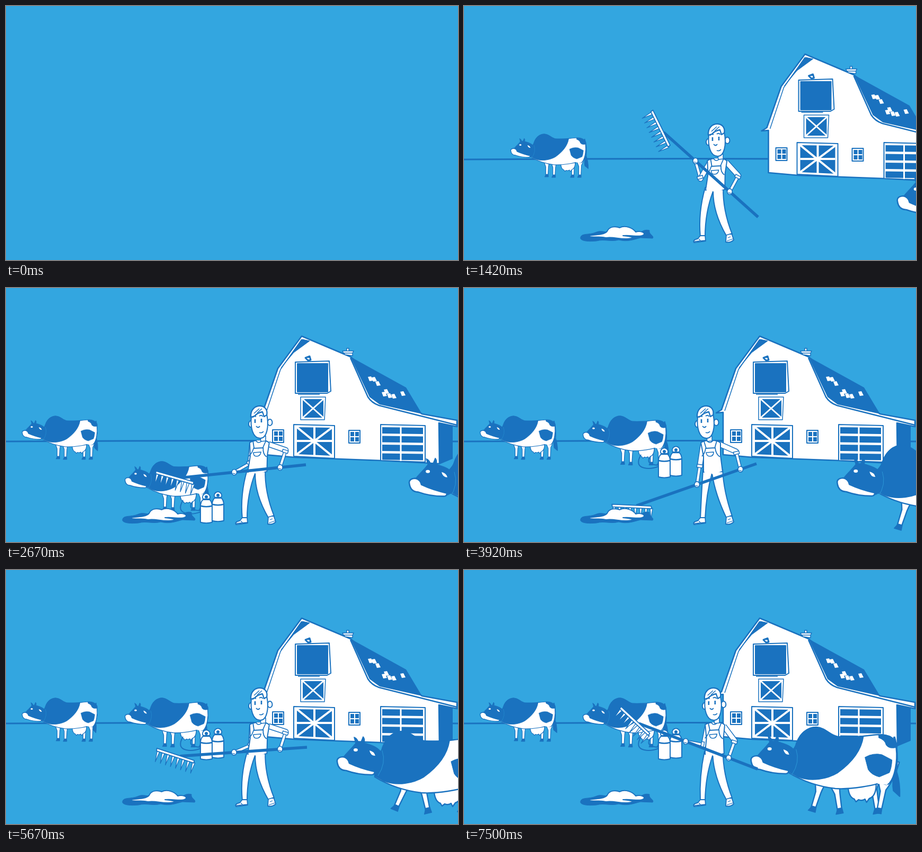
These frames come from a looping animation (853x480 px, 7580 ms). An HTML page with a canvas:

```html
<!DOCTYPE html>
<html>
<head>
<meta charset="utf-8">
<style>
html, body { margin: 0; width: 100%; height: 100%; overflow: hidden; background: #33a6e0; }
canvas { display: block; }
</style>
</head>
<body>
<canvas id="stage" width="853" height="480"></canvas>
<script>
const c = document.getElementById('stage').getContext('2d');
const SKY = '#33a6e0', DARK = '#1a72bf', WHITE = '#fff';
const LOOP = 7580, STEP = LOOP / 91, CYCLE = 3167, RAD = Math.PI / 180;
c.lineJoin = 'round';

function draw(d, fill, width = 2, stroke = DARK) {
  const path = new Path2D(d);
  if (fill) { c.fillStyle = fill; c.fill(path); }
  if (width) { c.lineWidth = width; c.strokeStyle = stroke; c.stroke(path); }
}
function place(x, y, deg, sx, sy, fn) {
  c.save();
  c.translate(x, y);
  c.rotate(deg * RAD);
  c.scale(sx, sy);
  fn();
  c.restore();
}
function dot(x, y, rx, ry, fill, width = 0) {
  c.beginPath();
  c.ellipse(x, y, rx, ry, 0, 0, 7);
  c.fillStyle = fill;
  c.fill();
  if (width) { c.lineWidth = width; c.strokeStyle = DARK; c.stroke(); }
}
const clamp = u => Math.max(0, Math.min(1, u));

// Eased values between rows of [time, ...values]
function keyed(t, rows) {
  let i = 1;
  while (i < rows.length - 1 && t > rows[i][0]) i++;
  const a = rows[i - 1], b = rows[i];
  const u = clamp((t - a[0]) / (b[0] - a[0])), s = u * u * (3 - 2 * u);
  return a.slice(1).map((v, k) => v + (b[k + 1] - v) * s);
}
// Damped spring that ends at rest
function spring(t, start, from) {
  const dt = Math.max(0, t - start), u = clamp(dt / 1600);
  return from * (1 - u) ** 2 * Math.cos(Math.PI * dt / 500);
}

function leg(x, y, deg, hind) {
  place(x, y, deg, 1, 1, () => {
    const len = hind ? 72 : 60;
    draw(hind ? 'M-18,-30L22,-30Q18,5 6,26L4,68L-4,68L-4,30Q-14,8 -18,-30Z'
              : 'M-15,-8L13,-8Q6,8 5,22L3,57L-5,57L-5,22Z', WHITE, 2.4);
    draw(`M-4,${len - 10}L4,${len - 10}L5,${len}L-9,${len}Z`, DARK, 1.5);
  });
}
function cow(x, y, sx, sy, { swing = 0, nod = 0, bob = 0, wag }) {
  place(x, y, 0, sx, sy, () => {
    leg(160, 104, -swing * .7);
    leg(134, 102, swing * 1.15);
    leg(228, 92, -swing * .7, true);
    leg(254, 92, swing * .7, true);
    place(0, bob, 0, 1, 1, () => {
      place(271, 18, wag, 1, 1, () => {
        draw('M0,0Q8,27 3,72', null, 4);
        draw('M1,67Q-5,87 -2,102L10,113Q11,87 5,68Z', DARK);
      });
      draw('M184,112Q185,132 196,136l3,5 5,-4Q210,140 216,136l3,6 5,-7Q238,130 237,105Z', WHITE, 2.4);
      draw('M84,40C90,12 108,0 124,0C142,1 150,16 165,18C190,21 215,16 242,14C262,14 272,22 275,40C278,65 272,95 262,106C258,110 252,108 247,104C235,110 190,118 160,116C125,112 95,100 72,86Z', WHITE, 2.4);
      // Cover the outline where the thigh joins the body
      draw('M228,70L268,72Q266,95 258,109L240,107Z', WHITE, 0);
      draw('M66,60C78,44 84,40 88,28C94,10 108,0 124,0C142,1 150,16 165,18L213,18C209,45 190,68 165,86C145,98 115,104 90,94L72,84Z', DARK, 1.5);
      draw('M242,14Q268,12 276,30L277,38Q262,42 256,34Q254,24 242,20Z', DARK, 1);
      draw('M216,57Q232,48 248,52L267,62Q266,78 262,86L243,94Q228,90 222,80Z', DARK, 1);
    });
    place(0, nod, 0, 1, 1, () => {
      draw('M36,28L33,17Q40,20 41,27ZM46,26L50,16Q54,20 52,27Z', DARK, 1.5);
      draw('M12,55C20,45 28,38 36,28Q45,24 60,30C80,36 90,46 88,64C85,80 78,84 72,86L20,80Z', DARK, 1);
      draw('M1,63Q0,55 12,54Q22,56 24,66Q45,76 72,82Q72,88 66,88Q40,88 18,80Q3,80 1,63Z', WHITE, 2.6);
      draw('M62,42q9,2 11,10q-9,0 -11,-10Z', WHITE, 0);
      draw('M86,42Q94,66 78,90', null, .7, SKY);
      dot(36, 41, 4, 3, WHITE);
    });
  });
}

function can(x, y) {
  place(x, y, 0, 1, 1, () => {
    draw('M-6,-44a7,7 0 1 1 12,0Z', WHITE);
    dot(0, -48, 3, 3, DARK);
    draw('M-11,0L-11,-32Q-10,-40 -6,-43L6,-43Q10,-40 11,-32L11,0Q0,3 -11,0Z', WHITE);
    draw('M-11,-31Q0,-28 11,-31M-6,-43L6,-43', null, 2.5);
  });
}

function smallWindow(x, y) {
  draw(`M${x},${y}h21v24h-21Z`, WHITE);
  for (const dx of [3, 12]) for (const dy of [3, 13]) draw(`M${x + dx},${y + dy}h7v8h-7Z`, DARK, 0);
}
function barn(x) {
  place(x, 0, 0, 1, 1, () => {
    draw('M817,255L842,260L842,322L818,332Z', DARK);
    draw('M558,91L513,152L486,230L476,236L489,235L489,315L545,320L707,326L818,332L817,255L851,262L851,250L785,238L650,130Z', WHITE, 2.6);
    draw('M650,130L755,188L785,238L705,220L686,206Z', DARK, 0);
    draw('M650,132L683,206Q690,217 704,222L851,259', null, 2.5);
    draw('M559,97L573,100L543,122L519,151Z', DARK, 1);
    draw('M558,97L518,154L492,232', null, 1.5);
    for (const [px, py] of [[683, 168], [690, 169], [697, 177], [709, 197], [713, 192], [719, 200], [727, 201], [744, 196]])
      draw(`M${px},${py}l6,-1l4,8l-7,1Z`, WHITE, 0);
    draw('M643,119v-5h4v5M635,119h21l-2,4h-17ZM637,123l17,0v5l-14,-2Z', WHITE, 1.5);
    draw('M565,132l8,-3l2,7l-5,1Z', WHITE, 3);
    draw('M546,140L610,138L613,195L606,199L546,199Z', WHITE);
    draw('M550,143h57v53h-57Z', DARK);
    draw('M551,201H592M556,206H603L601,249H556Z', WHITE, 1.5);
    draw('M560,210h39v35h-39Z', DARK, 0);
    draw('M560,210L599,245M599,210L560,245', null, 3, WHITE);
    draw('M543,258L620,260L620,322L543,318Z', WHITE);
    draw('M549,263L615,264L615,317L549,314Z', DARK, 0);
    draw('M549,263L615,317M615,264L549,314M582,263V317M549,289H615', null, 4, WHITE);
    draw('M707,258L791,260L791,329L707,326Z', WHITE);
    for (let i = 0; i < 4; i++) draw(`M710,${263 + i * 16.5}l77,1v12l-77,-1Z`, DARK, 0);
    draw('M745,261V327', null, 3, WHITE);
    smallWindow(503, 268);
    smallWindow(647, 269);
  });
}

// Two-bone arm, elbow bent outward, with a rolled cuff
function arm(sx, sy, hx, hy, bone) {
  const dx = hx - sx, dy = hy - sy, d = Math.hypot(dx, dy);
  const bend = Math.sqrt(Math.max(0, bone * bone - d * d / 4)) / d;
  const ex = sx + dx / 2 + dy * bend, ey = sy + dy / 2 - dx * bend;
  const along = (u, x, y) => `${ex + (x - ex) * u},${ey + (y - ey) * u}`;
  const limb = (d, w) => { draw(d, null, w + 3); draw(d, null, w, WHITE); };
  limb(`M${ex},${ey}L${hx},${hy}`, 4);
  limb(`M${sx},${sy}L${ex},${ey}L${along(.08, hx, hy)}`, 8);
  draw(`M${along(-.02, hx, hy)}L${along(.17, hx, hy)}`, null, 12);
  draw(`M${along(.02, hx, hy)}L${along(.13, hx, hy)}`, null, 9, WHITE);
}

function head(x) {
  place(x, 0, 0, 1, 1, () => {
    draw('M458,280L459,290L468,289L468,280Z', WHITE, 1.5);
    dot(440, 257, 4, 6, WHITE, 2);
    dot(476, 254, 4.5, 6, WHITE, 2);
    draw('M441,244C439,262 443,284 458,284C470,284 475,262 470,238C464,226 445,228 441,244Z', WHITE);
    draw('M440,244C439,230 448,222 459,223C468,224 472,232 470,240L465,243L462,234Q452,236 447,242Z', WHITE, 2.3);
    draw('M446,237L456,228M452,236L461,228', null, 1.5);
    draw('M443,245Q446,241 450,243M456,242Q460,239 463,243', null, 2);
    draw('M448,248v7M460,247v7', null, 2.6);
    draw('M450,261Q454,266 457,261M456,273Q461,275 464,271', null, 1.8);
  });
}

function body(lean) {
  const hip = lean * .2;
  draw(`M${451 + hip},343Q${448 - hip * 1.5},390 446,436L455,436Q${457 - hip * .5},390 ${468 + hip * .5},350Q${474 - hip},390 495,434L506,431Q${490 - hip * .5},385 ${488 + hip * .3},343Z`, WHITE);
  draw('M446,434L455,434L456,444L434,447Q431,442 441,440ZM495,433L505,430L509,442Q503,448 494,446Z', WHITE, 1.8);
  draw('M434,445L455,443M496,444L508,440M443,440l3,3M498,438l5,-2', null, 1.3);
  c.save();
  c.transform(1, 0, -lean * .4 / 57, 1, hip + lean * .4 * 347 / 57, 0);
  draw('M447,292Q457,287 468,288Q480,288 484,293L484,316L488,347L452,348L452,318Z', WHITE);
  draw('M449,318Q455,312 456,303L474,302Q475,314 483,319M453,290L457,303M477,289L473,303', null, 1.8);
  draw('M457,311L471,310Q471,318 464,318Q458,318 457,311Z', WHITE, 1.6);
  draw('M458,288Q464,296 470,288', WHITE, 1.5);
  draw('M453,343L456,320L482,320L486,346L471,353L466,350L454,352Z', WHITE, 0);
  c.restore();
}

function rake(ex, ey, deg) {
  place(ex, ey, deg, 1, 1, () => {
    draw('M-240,0L0,0', null, 5.5);
    place(-239, 2, 22, 1, 1, () => {
      for (let i = 0; i < 8; i++) draw(`M${-46 + i * 10},2l5,0l-2,21Z`, WHITE, 1.3);
      draw('M-48,-2L26,-2L27,3L-47,3Z', WHITE, 1.8);
    });
  });
}

function pile() {
  draw('M220,437C222,429 236,433 248,428C258,423 266,428 274,427L330,430Q340,421 350,424C348,432 360,434 356,439L333,438C318,442 308,446 292,442C276,446 266,440 250,444C230,446 218,443 220,437Z', DARK, 1);
  draw('M233,435C246,431 262,434 270,426C274,416 286,416 294,419C304,413 319,420 324,427C333,424 345,429 338,433C330,438 316,432 300,434C322,436 322,439 308,440C292,441 284,436 268,438C254,434 246,439 233,435Z', WHITE, 2);
}
function splash(ms) {
  const s = ms / 120;
  if (s < 0 || s > 5) return;
  for (const [dx, dy] of [[-46, -33], [-13, -51], [8, -31], [26, -24], [-21, -16]]) {
    const x = 285 + dx * s, y = 425 + (dy - 15) * s + 15 * s * s;
    if (y > 430) continue;
    dot(x, y, 5, 4.5, DARK);
    dot(x + 1, y - 1, 2.8, 3, WHITE);
  }
}

// Rows: phase, handle end x and y, angle, grip distance, lean
const POSES = [
  [0, 552, 332, -19.3, 32, 0],
  [680, 555, 399, 42, 72, 21],
  [960, 528, 309, -25.6, 32, 0],
  [1120, 528, 309, -25.6, 32, 0],
  [1740, 568, 335, -4, 51, 22],
  [1920, 566, 334, -6, 49, 22],
  [2500, 552, 332, -19.3, 32, 0],
  [CYCLE, 552, 332, -19.3, 32, 0]
];
function farmer(t) {
  const phase = (t - 750 + CYCLE) % CYCLE;
  const [ex, ey, deg, grip, lean] = keyed(phase, POSES);
  const hand = d => [ex - d * Math.cos(deg * RAD), ey - d * Math.sin(deg * RAD)];
  const near = hand(grip), far = hand(grip + 87);
  const rise = 260 * (1 - clamp((t - 80) / 994)) ** 3;
  place(0, rise, 0, 1, 1, () => {
    arm(482 + lean * .6, 295, ...near, 34.5);
    arm(451 + lean * .6, 296, ...far, 35);
    body(lean);
    head(lean);
    rake(ex, ey, deg);
    for (const [x, y] of [near, far]) {
      dot(x, y, 4.8, 5.5, WHITE, 1.6);
      draw(`M${x - 3},${y + 2}l5,1`, null, 1.2);
    }
    pile();
    splash(phase - 960);
  });
}

function frame(now) {
  const t = Math.floor((now % LOOP) / STEP + .1) * STEP;
  c.fillStyle = SKY;
  c.fillRect(0, 0, 853, 480);
  if (t > 80 && t < LOOP) {
    const reach = 1 - (1 - clamp((t - 40) / 450)) ** 3;
    c.save();
    c.beginPath();
    c.rect(0, 0, 853 * reach, 480);
    c.clip();
    draw('M0,290Q430,287 853,290', null, 2.8);
    c.restore();

    const wag = 5 * Math.sin(t / 400), stride = Math.cos(2 * Math.PI * (t - 5670) / 1220);
    cow(30 + spring(t, 1080, -180), 242, .515, .5, { wag });
    barn(390 * (1 - clamp((t - 900) / 1300)) ** 3);
    const [nod] = keyed(t, [[750, 6], [1830, 9], [3920, 8], [5670, 2], [7500, 0]]);
    cow(847 - .0454 * (t - 750), 297, 1, 1, { swing: 17 + 3 * stride, bob: 4 + 4 * stride, nod, wag: wag * .6 });
    if (t > 2000) place(0, spring(t, 2020, -395), 0, 1, 1, () => {
      cow(224, 242, .57, .565, { wag });
      draw('M334,315Q322,336 340,340Q352,343 368,337M352,318Q340,334 368,335', null, 2);
      can(400, 354);
      can(378, 357);
    });
    farmer(t);
  }
  requestAnimationFrame(frame);
}
requestAnimationFrame(frame);
</script>
</body>
</html>
```
